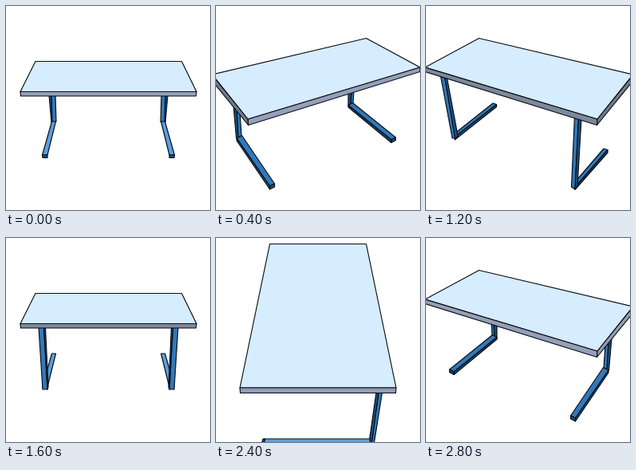
An HTML page that plays this animation: 256x256 px, repeating every 3200 ms.

```html
<!DOCTYPE html>
<html lang="en">
<head>
<meta charset="utf-8">
<title>Turning table</title>
<style>
html, body { margin: 0; width: 100%; height: 100%; overflow: hidden; background: #fff; }
svg { display: block; width: 100vw; height: 100vh; }
polygon { stroke: #080b10; stroke-width: 1.15; stroke-linejoin: round; }
</style>
</head>
<body>
<svg viewBox="0 0 256 256"></svg>
<script>
const STEP = 400;
const TOP = '#d6ecff', FRONT = '#949fba', BACK = '#7c899d', DARK_END = '#707b8c', LIGHT_END = '#929eb6';
const LIGHT = '#5a9fe0', BLUE = '#3079ba', NAVY = '#1d4f7d';

const face = (fill, points) => ({ fill, points });
const flip = (faces, sum) => faces.map(({ fill, points }) =>
  face(fill, points.replace(/(-?[\d.]+),/g, (_, x) => `${sum - x},`)));
const both = faces => [...faces, ...flip(faces, 257)];

// Slabs: one for each kind of view
const wideSlab = edge => [
  face(TOP, '37,69.5 220.5,69.5 239,107.5 18,107.5'),
  face(edge, '18,107.5 239,107.5 238.5,113 18.5,113')];
const longSlab = edge => [
  face(TOP, '67.5,7.5 188.5,7.5 226,188 30,188'),
  face(edge, '30,188 226,188 225.5,194.5 30.5,194.5')];
const slantSlab = (long, end) => [
  face(TOP, '-1,77 66.5,40.5 260,86 215,142'),
  face(long, '-1,77 215,142 214.5,149.5 -1,82.5'),
  face(end, '215,142 260,86 259,95 214.5,149.5')];

// Legs with the feet towards the viewer, or away
const wideNear = both([
  face(NAVY, '54,112 57,112 59,145 57,146'),
  face(BLUE, '57,112 62,112 63,145 58,146'),
  face(LIGHT, '57.5,145 62.5,145 52,187 45.5,187'),
  face(NAVY, '45.5,187 52,187 52,190.5 46,190.5')]);
const wideFar = both([
  face(LIGHT, '57.5,145 62.5,145 52,187 45.5,187'),
  face(BLUE, '41,112 47.5,112 52,190 46,190'),
  face(NAVY, '47.5,112 49.5,112 53,187 52,190')]);
const longLegs = [
  face(BLUE, '47.5,194 52,194 61,257 57.5,257'),
  face(NAVY, '52,194 55,194 64,257 60.5,257'),
  face(LIGHT, '62.5,252 194.5,252 196,257 63,257'),
  face(NAVY, '194.5,252 197,252 198.5,257 196,257')];
const slantFar = [
  face(BLUE, '84,122 88.5,123.5 40,162 36,160'),
  face(NAVY, '88.5,123.5 88.5,126.5 36,168 39,162'),
  face(BLUE, '18,86 23,86 37,166 33,166'),
  face(NAVY, '23,86 26,88 40,163 36.5,167'),
  face(BLUE, '223,179 228,180.5 190,224 186,222'),
  face(NAVY, '228,180.5 228,184 187,230.5 190,224'),
  face(BLUE, '186.5,138 191.5,140 187,230 182.5,227'),
  face(NAVY, '191.5,140 195,141 190,226 187,230')];
const slantNear = [
  face(BLUE, '82,106 85,107 86,123 83,122'),
  face(NAVY, '85,107 89,108 89,125 86,123'),
  face(BLUE, '83.5,121.5 89,124.5 35,168 29.5,165'),
  face(NAVY, '89,124.5 89,127 35,171.5 35,168'),
  face(NAVY, '29.5,165 35,168 35,171.5 29.5,168.5'),
  face(BLUE, '225,134 229,130 227.5,165 223,163'),
  face(NAVY, '229,130 233,126 229.5,166 227,165'),
  face(BLUE, '222.5,162.5 229,166 187.5,226 181.5,223'),
  face(NAVY, '229,166 229,169 187.5,230 187.5,226'),
  face(NAVY, '181.5,223 187.5,226 187.5,230 181.5,227')];

const poses = [
  [...wideNear, ...wideSlab(FRONT)],
  flip([...slantNear, ...slantSlab(FRONT, DARK_END)], 255),
  [...longLegs, ...longSlab(DARK_END)],
  [...slantFar, ...slantSlab(BACK, DARK_END)],
  [...wideFar, ...wideSlab(BACK)],
  flip([...slantFar, ...slantSlab(BACK, LIGHT_END)], 255),
  flip([...longLegs, ...longSlab(LIGHT_END)], 256),
  [...slantNear, ...slantSlab(FRONT, LIGHT_END)]
];

const svg = document.querySelector('svg');
const drawings = poses.map(faces => faces.map(({ fill, points }) =>
  `<polygon fill="${fill}" points="${points}"/>`).join(''));

const start = performance.now();
let shown = -1;
function tick(now) {
  const pose = Math.floor(Math.max(0, now - start) / STEP) % poses.length;
  if (pose !== shown) {
    svg.innerHTML = drawings[pose];
    shown = pose;
  }
  requestAnimationFrame(tick);
}
tick(start);
</script>
</body>
</html>
```
